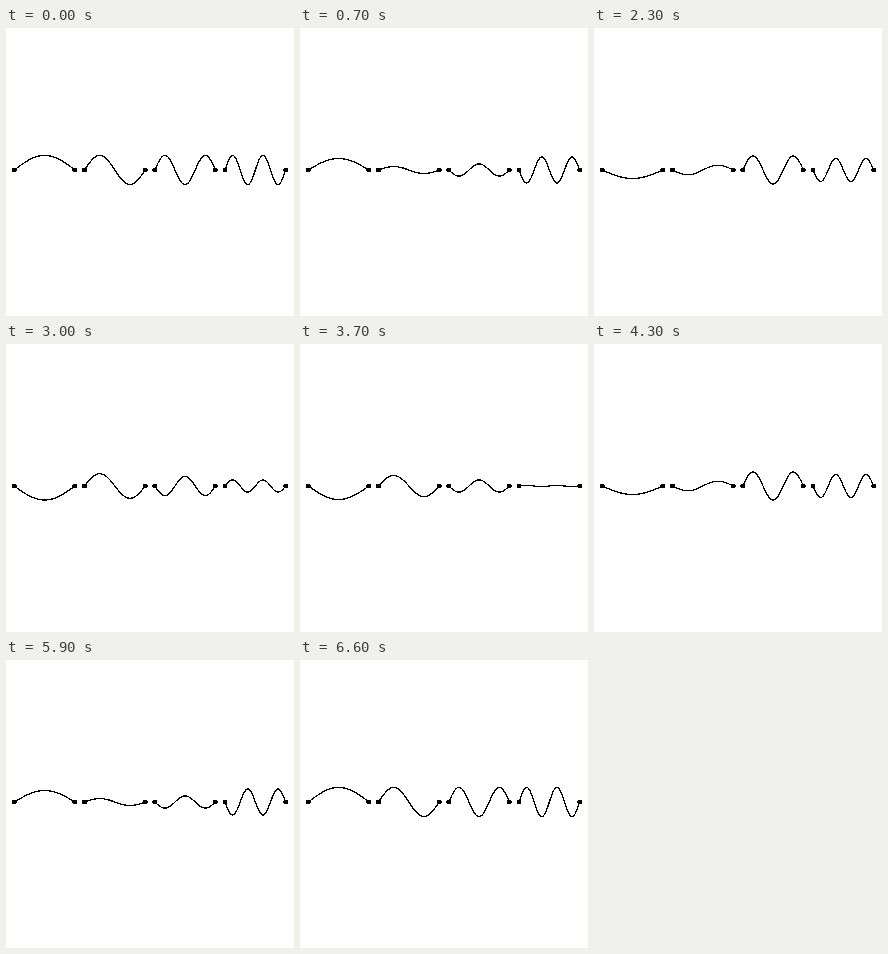
These frames come from a looping animation (288 by 288 pixels, 6700 ms). An HTML page:

```html
<!DOCTYPE html>
<html lang="en">
<head>
<meta charset="utf-8">
<title>Standing waves</title>
<style>
  html, body { margin: 0; width: 100%; height: 100%; overflow: hidden; background: #fff; }
  svg { display: block; width: 100vw; height: 100vh; }
  path { fill: none; stroke: #000; stroke-width: 1.3; stroke-linejoin: round; }
</style>
</head>
<body>
<svg id="stage" viewBox="0 0 288 288" shape-rendering="crispEdges"></svg>
<script>
const LOOP = 6700, STEP = 100, CYCLE = 66;
const LEFT = 8.3, PITCH = 70.25, LENGTH = 60.6, MID = 142, AMPLITUDE = 14.6;
const SEGMENTS = 80;
const stage = document.getElementById('stage');

function add(tag, attributes) {
  const node = document.createElementNS('http://www.w3.org/2000/svg', tag);
  for (const name in attributes) node.setAttribute(name, attributes[name]);
  return stage.appendChild(node);
}

const strings = [1, 2, 3, 4].map(mode => {
  const x = LEFT + PITCH * (mode - 1);
  const path = add('path', {});
  for (const cx of [x, x + LENGTH]) add('circle', { cx, cy: MID, r: 2.5 });
  return { mode, x, path };
});

function wave({ mode, x }, phase) {
  const height = AMPLITUDE * Math.cos(mode * phase);
  const points = [];
  for (let i = 0; i <= SEGMENTS; i++) {
    const u = i / SEGMENTS;
    const y = MID - height * Math.sin(mode * Math.PI * u);
    points.push((x + LENGTH * u).toFixed(2) + ' ' + y.toFixed(2));
  }
  return 'M' + points.join('L');
}

function draw(time) {
  const step = Math.floor((time % LOOP) / STEP);
  const phase = 2 * Math.PI * step / CYCLE;
  for (const string of strings) string.path.setAttribute('d', wave(string, phase));
}

const start = performance.now();
function tick() {
  draw(performance.now() - start);
  requestAnimationFrame(tick);
}
tick();
</script>
</body>
</html>
```
